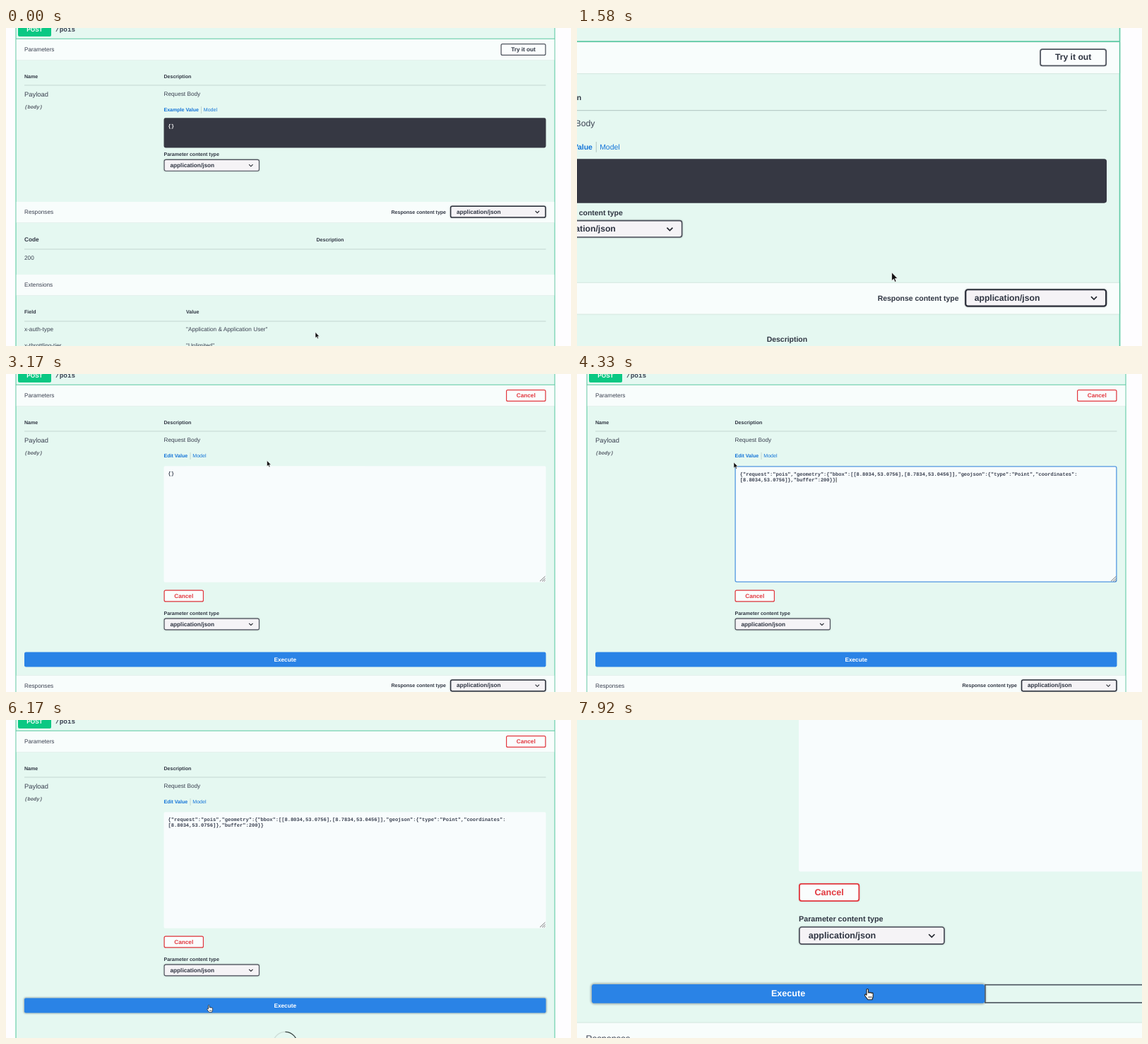
These frames come from a looping animation (800 px wide and 450 px high, 8000 ms). An HTML page:

```html
<!DOCTYPE html>
<html lang="en">
<head>
<meta charset="utf-8">
<title>API console</title>
<style>
  html, body { margin: 0; width: 100%; height: 100%; overflow: hidden; background: #fefdff; }
  svg { display: block; width: 800px; height: 450px; }
  text { font: 8.23px "Liberation Sans", Arial, sans-serif; fill: #3b4151; white-space: pre; text-rendering: geometricPrecision; }
  .b { font-weight: 700; fill: #2f3542; }
  .s { font-size: 7.06px; }
  .l { font-size: 9.4px; }
  .m { font-family: "Liberation Mono", "Courier New", monospace; font-weight: 700; }
  .i { font-style: italic; fill: #555b66; }
  .c { text-anchor: middle; }
  .w { fill: #fff; }
  .link { fill: #1273d8; }
  .red { fill: #e2383f; }
  .bar { fill: #f8fdfc; filter: drop-shadow(0 .6px .6px rgba(0,0,0,.16)); }
  .rule { stroke: #b9cdc8; stroke-width: .8; }
  .select { fill: #f5f3f6; stroke: #4a4e59; stroke-width: 1.1; filter: drop-shadow(0 .6px .8px rgba(0,0,0,.25)); }
  .heavy { stroke: #2a2e39; stroke-width: 1.5; }
  .button { fill: #fafdfd; stroke-width: 1.2; filter: drop-shadow(0 .6px .6px rgba(0,0,0,.12)); }
  .chevron { fill: none; stroke: #22252d; stroke-width: 1.1; }
  .halo { fill: none; stroke: #000; stroke-width: 1.6; filter: blur(1px); }
</style>
</head>
<body>
<svg viewBox="0 0 800 450"><g id="page"></g></svg>
<script>
const LOOP = 8000;
const WIDE = [1, 0, 0], RIGHT = [1.481, -382.2, -3.4], LOWER = [1.527, -27.3, -235.5];
const CUT_IN = 1330, EDIT = 2250, CUT_OUT = 2910, FOCUS = 3400, SELECTED = 3750,
      PASTE = 4000, BLUR = 5830, LOADING = 6040, CUT_LOWER = 6250, DONE = 6750;

// [start, end, x, y, bow in x, pointer shape on the way]
const START = [438, 430.5];
const MOVES = [
  [1170, 2000, 711.8, 35.4, -14, 'arrow'],
  [2830, 3330, 262, 150, 0, 'arrow'],
  [FOCUS, SELECTED, 222, 125, 0, 'beam'],
  [4500, 5250, 287.2, 403.2, 0, 'arrow']
];
const HOVERS = [[1950, 2860, 'hand'], [3250, 3720, 'beam'], [5200, LOOP, 'hand']];

const text = (x, y, str, cls = '') => `<text x="${x}" y="${y}" class="${cls}">${str}</text>`;
const rect = (x, y, w, h, attrs = '') => `<rect x="${x}" y="${y}" width="${w}" height="${h}" ${attrs}/>`;
const rule = y => `<path class="rule" d="M26 ${y}H764.5"/>`;
const group = (id, body) => `<g id="${id}">${body}</g>`;
const bar = (y, title) => rect(14.6, y, 761.8, 29.5, 'class="bar"') + text(26, y + 17.2, title);
const select = (x, y, heavy = '') =>
  rect(x + .6, y + .6, 134.3, 15.8, `rx="2.2" class="select ${heavy}"`) +
  text(x + 9, y + 11.1, 'application/json', 'b') +
  `<path class="chevron" d="M${x + 120.6} ${y + 7.3}l2.7 2.7 2.7-2.7"/>`;
const button = (x, y, w, label, stroke, cls) =>
  rect(x + .6, y + .6, w - 1.2, 15.8, `rx="2" class="button" stroke="${stroke}"`) +
  text(x + w / 2, y + 11, label, 'c b ' + cls);
const cancel = (x, y) => button(x, y, 56.5, 'Cancel', '#e2383f', 'red');
const halo = (id, x, y, w, h) => rect(x, y, w, h, `id="${id}" rx="2.4" class="halo"`);
const tabs = (name, split) =>
  text(223.5, 118.3, name, 's b link') + text(split + 3.3, 118.3, 'Model', 's link') +
  `<path class="rule" d="M${split} 111v10"/>`;
const contentType = y => text(223.5, y, 'Parameter content type', 's b') + select(223.5, y + 4.4);

const frame =
  rect(14, -10, 763, 900, 'fill="#e5f8f1" stroke="#5fcaa4" stroke-width="1.1"') +
  rect(17, -8, 47, 20, 'rx="2" fill="#0ac883"') +
  text(40.5, 5.3, 'POST', 'c b w') + text(70, 5.3, '/pois', 'm l') +
  bar(16, 'Parameters') +
  '<path d="M14 15.2H777" stroke="#5fcaa4" stroke-width="1.1"/>' +
  text(26, 71.3, 'Name', 's b') + text(223.5, 71.3, 'Description', 's b') + rule(81) +
  text(26, 97, 'Payload', 'l') + text(26.3, 114.2, '(body)', 's m i') +
  text(223.5, 96, 'Request Body');

const view =
  halo('tryHalo', 700.5, 22, 64, 17) +
  button(700.5, 22, 64, 'Try it out', '#50555f', '') + tabs('Example Value', 276.5) +
  rect(223.5, 127.3, 541, 42.2, 'rx="2.4" fill="#363843"') +
  text(229.5, 140.7, '{}', 's m w') + contentType(181.4);

const edit =
  halo('cancelHalo', 708, 22, 56.5, 17) + cancel(708, 22) + tabs('Edit Value', 261) +
  rect(223.5, 130.3, 541, 164.4, 'rx="2.2" fill="#f8fcfd"') +
  rect(224.1, 130.9, 539.8, 163.2, 'id="focusRing" rx="2" fill="none" stroke="#4f96df" stroke-width="1.3"') +
  '<path d="M756 293.3l7.4-7M759 293.5l4.6-4.3M761.6 293.7l2-1.9" stroke="#555" stroke-width=".8"/>' +
  rect(230.5, 137, 8.5, 8.3, 'id="selection" fill="#b3d7fd"') +
  group('empty', text(229.5, 142.5, '{}', 's m')) +
  group('json',
    text(229.5, 142.5, '{"request":"pois","geometry":{"bbox":[[8.8034,53.0756],[8.7834,53.0456]],"geojson":{"type":"Point","coordinates":', 's m') +
    text(229.5, 150.7, '[8.8034,53.0756]},"buffer":200}}', 's m') +
    rect(365.5, 145.2, .8, 7, 'id="caret" fill="#222"')) +
  cancel(223.5, 305.5) + contentType(341.1) +
  halo('runHalo', 26, 393.5, 738.5, 21) +
  group('clear', rect(0, 399.7, 1, 1, 'id="clearBox" fill="none" stroke="#4f5862" stroke-width="1.1"') +
    text(0, 0, 'Clear', 'c b')) +
  rect(26, 393.5, 738.5, 21, 'id="run" rx="2.2" fill="#2a83e6"') +
  text(395.3, 406.6, 'Execute', 'c b w').replace('<text', '<text id="runLabel"');

const responses =
  bar(246, 'Responses') + text(545.5, 262.6, 'Response content type', 's b') +
  select(629, 251.7, 'heavy') +
  text(26, 302.3, 'Code', 'b') + text(439.5, 301.9, 'Description', 's b') + rule(313) +
  text(26, 327.6, '200') + bar(349, 'Extensions') +
  text(26, 404.2, 'Field', 's b') + text(255, 404.2, 'Value', 's b') + rule(415) +
  text(26, 429, 'x-auth-type') + text(255, 429, '"Application &amp; Application User"') +
  text(26, 452.3, 'x-throttling-tier') + text(255, 452.3, '"Unlimited"');

const spinner =
  '<circle r="17" fill="none" stroke="#555" stroke-opacity=".16" stroke-width="1.2"/>' +
  '<path d="M-12-12A17 17 0 0 1 12-12" fill="none" stroke="#3c4744" stroke-width="1.3"/>';

const pointers =
  group('arrow', '<path d="M0 0V8L1.9 6.4 3.1 9.2 4.4 8.6 3.2 5.9H5.7Z" fill="#111" stroke="#fff" stroke-width=".5"/>') +
  group('hand', '<g transform="translate(-2.8)" fill="#fff" stroke="#222" stroke-width=".75" stroke-linejoin="round">' +
    '<path d="M2 6V1a.8.8 0 0 1 1.6 0V4a.75.75 0 0 1 1.5.1a.75.75 0 0 1 1.5.3a.7.7 0 0 1 1.4.4V7.4L7.2 10.2H3.2L.5 6.6Q0 5.7.6 5.3T2 6Z"/>' +
    '<path d="M4 7V8.8M5.2 7V8.8M6.4 7V8.8" stroke-width=".5"/></g>') +
  group('beam', '<path d="M-1.6-4.5Q0-4.5 0-3.5Q0-4.5 1.6-4.5M0-3.5V3.5M-1.6 4.5Q0 4.5 0 3.5Q0 4.5 1.6 4.5" fill="none" stroke="#222" stroke-width=".8"/>');

document.getElementById('page').innerHTML = frame + group('view', view) + group('edit', edit) +
  group('responses', responses) + group('spinner', spinner) + group('pointer', pointers);

const el = {};
document.querySelectorAll('[id]').forEach(node => el[node.id] = node);
const clearLabel = el.clear.querySelector('text');

const clamp = v => Math.min(1, Math.max(0, v));
const smooth = p => p * p * (3 - 2 * p);
const show = (node, on) => node.style.display = on ? '' : 'none';
const set = (node, attrs) => { for (const key in attrs) node.setAttribute(key, attrs[key]); };

// CSS "ease": cubic-bezier(.25, .1, .25, 1)
function ease(p) {
  let lo = 0, hi = 1, u = .5;
  for (let i = 0; i < 16; i++) {
    u = (lo + hi) / 2;
    const x = .75 * u * (1 - u) + u ** 3;
    if (x < p) lo = u; else hi = u;
  }
  return .3 * u * (1 - u) ** 2 + 3 * u * u * (1 - u) + u ** 3;
}

function drawPointer(t) {
  let [x, y] = START, shape = 'arrow';
  for (const [from, to, nx, ny, bow, kind] of MOVES) {
    if (t < from) break;
    const p = smooth(clamp((t - from) / (to - from)));
    x += (nx - x) * p + bow * 4 * p * (1 - p);
    y += (ny - y) * p;
    if (p < 1) shape = kind;
  }
  const hover = HOVERS.find(([from, to]) => t >= from && t < to);
  if (hover) shape = hover[2];
  for (const kind of ['arrow', 'hand', 'beam']) show(el[kind], kind === shape);
  set(el.pointer, { transform: `translate(${x} ${y})` });
}

function drawRunButtons(t) {
  const done = t >= DONE, grow = done ? ease(clamp((t - DONE) / 300)) : 0;
  const total = 728.5;
  const x = done ? 31.6 : 26, y = done ? 399.1 : 393.5, height = 21 - 3.4 * grow;
  const width = done ? Math.max(80.9, total * grow / (1 + grow)) : 738.5;
  const box = { x, y, width, height }, base = y + height / 2 + 2.6;
  set(el.run, box);
  set(el.runHalo, box);
  set(el.runLabel, { x: x + width / 2, y: base });
  set(el.clearBox, { x: x + width + .5, y: y + .5, width: total - width - 1, height: height - 1 });
  set(clearLabel, { x: x + (width + total) / 2, y: base });
  show(el.clear, done);
  return done ? 192.4 - 3.4 * grow : 180.6;
}

function render(t) {
  const editing = t >= EDIT, focused = t >= FOCUS && t < BLUR, loading = t >= LOADING && t < DONE;
  const [scale, dx, dy] = t >= CUT_LOWER ? LOWER : t >= CUT_IN && t < CUT_OUT ? RIGHT : WIDE;
  set(el.page, { transform: `translate(${dx} ${dy}) scale(${scale})` });

  show(el.view, !editing);
  show(el.edit, editing);
  show(el.empty, t < PASTE);
  show(el.json, t >= PASTE);
  show(el.focusRing, focused);
  show(el.selection, t >= SELECTED - 150 && t < PASTE);
  show(el.caret, focused && (t - PASTE) % 1000 < 670);
  const nudge = focused ? 'translate(1.2 1.2)' : '';
  set(el.json, { transform: nudge });
  set(el.empty, { transform: nudge });

  const fade = from => .38 * clamp((t - from) / 300);
  el.tryHalo.style.opacity = fade(1930);
  el.cancelHalo.style.opacity = t < CUT_OUT ? .38 : 0;
  el.runHalo.style.opacity = fade(5170);

  const shift = drawRunButtons(t);
  show(el.responses, !loading);
  set(el.responses, { transform: `translate(0 ${editing ? shift : 0})` });
  show(el.spinner, loading);
  const turn = 45 + (Math.min(t, CUT_LOWER) - 6170) * .36;
  set(el.spinner, { transform: `translate(395.3 458.3) rotate(${turn})` });
  drawPointer(t);
}

const began = performance.now();
function tick() {
  render((performance.now() - began) % LOOP);
  requestAnimationFrame(tick);
}
tick();
</script>
</body>
</html>
```
